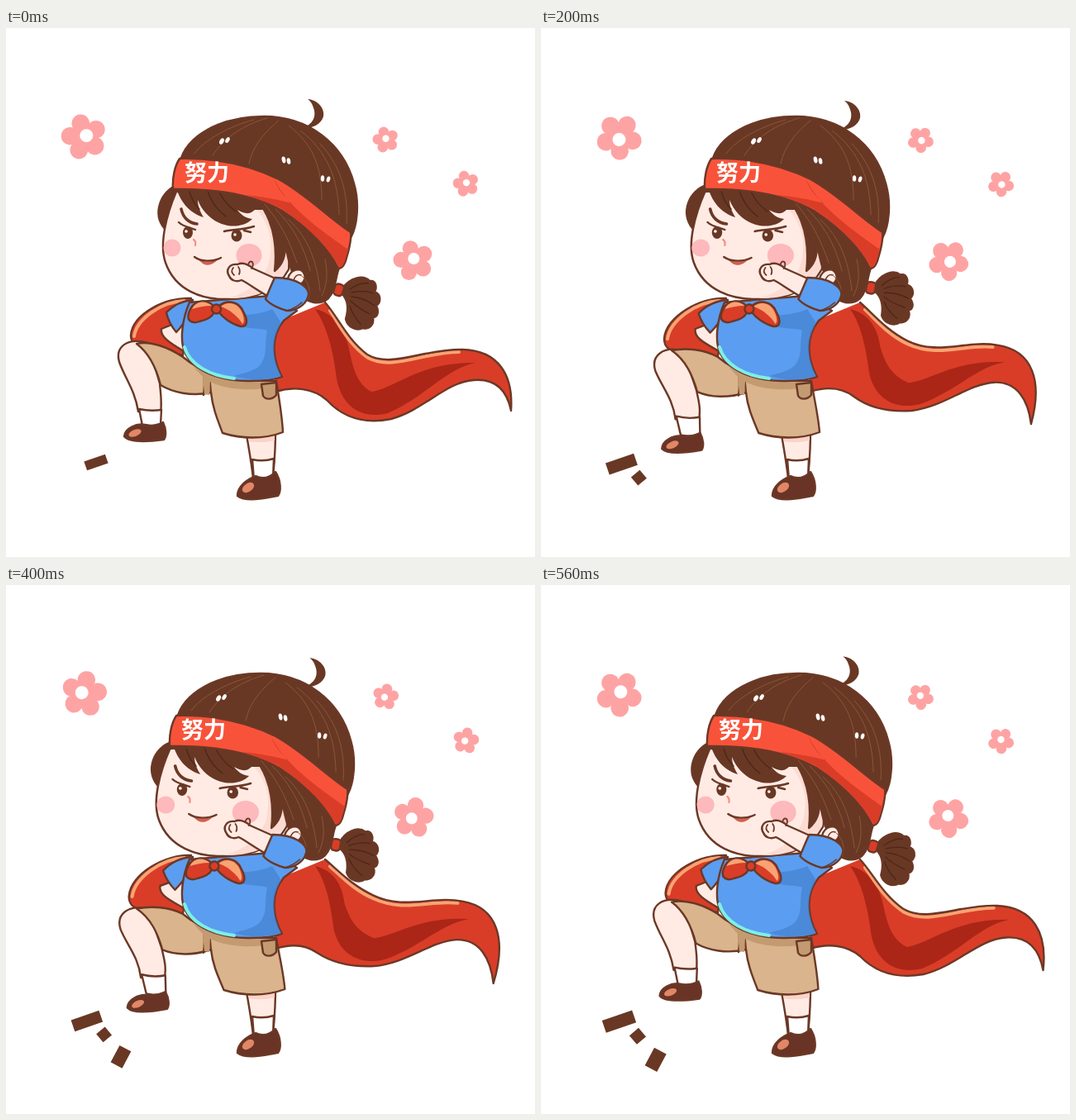
Animation of 640 by 640 pixels, one loop 600 ms. Source, as an HTML page:

```html
<!DOCTYPE html>
<html lang="zh">
<head>
<meta charset="utf-8">
<title>努力</title>
<style>
html, body { margin: 0; width: 100%; height: 100%; overflow: hidden; background: #fff; }
svg { display: block; width: 100vw; height: 100vh; }
.ln { stroke: #6b3826; stroke-width: 2.4; stroke-linejoin: round; stroke-linecap: round; }
.no { fill: none; }
.hair { fill: #683824; }
.skin { fill: #ffebe4; }
.shine { fill: none; stroke: #8d5637; stroke-width: 1; stroke-linecap: round; }
.lock { fill: none; stroke: #4d2618; stroke-width: 1.3; stroke-linecap: round; }
.red { fill: #d93d27; }
.dark { fill: #ab2617; }
.peach { fill: #f9a373; }
.blue { fill: #5b9df0; }
.navy { fill: #427fce; }
.tan { fill: #d9b48c; }
.shade { fill: #c49b70; }
.shoe { fill: #693425; }
.gloss { fill: #e28766; }
.white { fill: #fff; }
</style>
</head>
<body>
<svg viewBox="0 0 640 640">
  <g id="flowers" fill="#fea3a3"></g>
  <g id="chips" class="hair"></g>

  <!-- cape -->
  <path id="wing" class="red ln"/>
  <path id="wingEdge" class="no" stroke="#f9a373" stroke-width="4" stroke-linecap="round"/>
  <path id="cape" class="red"/>
  <path id="fold" class="dark"/>
  <path id="capeEdge" class="no" stroke="#f9a373" stroke-width="4" stroke-linecap="round"/>
  <path id="capeLine" class="ln no"/>

  <g id="tail">
    <path class="hair ln" d="M407 315 C416 302 432 298 440 306 C448 305 449 314 446 319 C454 322 454 332 448 336 C452 344 449 350 444 350 C446 360 438 365 432 363 C424 367 413 362 411 352 C414 342 415 331 407 322Z"/>
    <path class="lock" d="M416 316 C425 310 432 308 438 309 M418 320 C428 318 437 318 444 321 M418 325 C428 326 438 330 446 336 M417 330 C424 338 433 342 440 346 M416 336 C419 346 424 353 429 358"/>
    <rect class="red ln" x="397" y="310" width="11" height="14" rx="4" transform="rotate(18 403 317)"/>
  </g>

  <!-- standing leg -->
  <path class="skin ln" d="M290 486 C293 505 297 525 299 545 L323 543 C325 525 326 505 326 486Z"/>
  <path class="white ln" d="M298 522 Q311 525 324 521 L323 545 L300 547Z"/>
  <path fill="#fbd3c8" d="M292 494 L325 492 L325 499 Q308 503 294 500Z"/>
  <path class="shoe ln" d="M280 566 C280 554 292 546 302 542 C312 547 320 543 326 537 C333 548 333 561 329 566 C314 569 290 574 280 566Z"/>
  <ellipse class="gloss" cx="293" cy="556" rx="8" ry="5" transform="rotate(-35 293 556)"/>

  <!-- raised leg -->
  <path id="leg" class="skin ln"/>
  <path id="sock" class="white ln"/>
  <g id="foot">
    <path class="shoe ln" d="M143 494 C144 484 158 478 168 480 C176 482 184 480 190 477 C194 485 194 494 191 498 C176 500 150 503 143 494Z"/>
    <ellipse class="gloss" cx="156" cy="490" rx="8" ry="4" transform="rotate(-22 156 490)"/>
  </g>
  <path id="arm" class="skin ln"/>
  <path id="shorts" class="tan ln"/>
  <path id="crease" class="ln no"/>
  <path class="shade" d="M226 409 C250 424 290 430 327 428 L327 433 C300 440 268 438 247 428 L246 444 L240 443 L238 422Z"/>
  <path class="shade ln" stroke-width="1.6" d="M309 431 L327 429 L327 444 C322 450 314 450 311 445Z"/>

  <!-- shirt -->
  <path id="sleeve" class="blue ln"/>
  <path class="blue ln" d="M222 332 C214 350 209 378 217 394 C228 416 262 428 296 427 C312 427 324 426 334 422 C324 404 318 376 336 354 L352 342 L320 324Z"/>
  <path class="navy" d="M333 421 C324 404 319 380 333 357 L322 340 C300 350 276 346 262 350 C276 366 310 362 316 366 C312 384 318 400 304 411 C292 418 284 418 276 421 C296 427 318 426 333 421Z" opacity=".65"/>
  <path class="no" stroke="#7df0e6" stroke-width="4" stroke-linecap="round" d="M216 386 C222 408 248 421 276 424"/>
  <g id="scarf">
    <path class="red ln" d="M252 337 C242 327 226 328 221 345 C218 355 226 358 234 355 C244 353 250 348 252 344Z"/>
    <path class="peach" d="M225 340 C231 329 242 330 249 336 C240 336 232 338 225 340Z"/>
    <path class="red ln" d="M257 337 C266 328 282 330 287 343 C294 355 291 362 284 361 C272 358 262 350 257 343Z"/>
    <path class="peach" d="M260 337 C268 330 280 332 285 343 C288 350 289 356 286 358 C282 350 270 340 260 337Z"/>
    <circle class="red ln" cx="254.500" cy="340" r="5.500"/>
  </g>

  <g id="head">
    <g id="face">
      <path class="hair ln" d="M208 190 C188 196 176 224 192 243 L206 212 L240 196Z"/>
      <path class="skin ln" d="M206 198 C194 226 185 262 193 284 C205 318 238 329 268 328 C302 328 328 318 342 292 L345 230 L300 192Z"/>
      <path fill="#fcdcd2" d="M341 290 C328 318 300 328 268 327 C300 318 318 300 320 270 C322 246 312 228 300 216 L340 230Z"/>
      <g fill="#fdb9bb"><circle cx="201" cy="266" r="10.500"/><ellipse cx="294" cy="275" rx="15.500" ry="14"/></g>
      <path d="M227 256 Q230 258 229 263" fill="none" stroke="#f58f80" stroke-width="2.200" stroke-linecap="round"/>
      <g class="hair"><ellipse cx="220" cy="247.500" rx="6" ry="7.500"/><ellipse cx="279" cy="251" rx="6.500" ry="7.500"/></g>
      <g class="white"><circle cx="218" cy="246" r="1.800"/><circle cx="277" cy="250" r="1.800"/></g>
      <path class="ln no" d="M209 235 C214 240 221 241 229 244 M264 246 C273 243 286 245 300 240 M288 245 L296 247"/>
      <path class="ln no" style="stroke-width:3.600" d="M212 219 C214 229 221 236 231 237"/>
      <path d="M231 279 C239 284 249 283 257 279 C252 286 244 289 238 285Z" fill="#d2604e"/>
      <path class="ln no" d="M228 277 C236 283 250 283 260 278"/>
    </g>
    <path class="hair" d="M205 190 C210 210 222 224 239 229 C235 222 232 216 232 208 C238 224 252 236 268 239 C280 241 291 238 298 231 C290 230 284 226 280 220 C288 225 295 226 301 220 L330 220 L300 180Z"/>
    <path class="lock" d="M222 198 Q226 212 234 219 M244 197 Q250 216 266 228 M258 198 Q264 212 278 222"/>
    <path class="hair ln" d="M285 192 C316 212 330 248 325 294 C335 286 338 276 338 262 C341 278 343 288 347 297 L354 318 C362 334 380 336 390 327 C400 316 398 300 404 288 L416 248 L330 186Z"/>
    <path class="skin ln" d="M341 303 C344 292 357 288 361 298 C364 306 355 314 346 312Z"/>
    <path class="ln no" style="stroke-width:1.500" d="M348 305 Q351 297 357 299"/>
    <path class="shine" d="M312 212 C336 240 344 262 352 284 M326 219 C350 242 362 270 368 294 M342 232 C366 254 376 282 380 318 M358 300 C368 308 368 320 366 328 M386 280 C390 298 388 312 382 324"/>
    <path class="hair ln" d="M210 164 C217 130 260 107 312 107 C366 107 408 140 421 188 C428 212 425 240 417 254 L330 196Z"/>
    <path class="shine" d="M316 109 C290 116 264 132 250 154 M330 112 C308 130 298 146 294 164 M342 118 C374 142 382 172 382 208 M356 124 C390 150 402 184 403 226 M380 140 C406 168 414 200 412 236 M300 111 C270 119 240 135 228 152"/>
    <g class="white">
      <ellipse cx="261" cy="137" rx="2.500" ry="4" transform="rotate(28 261 137)"/>
      <ellipse cx="268" cy="135.500" rx="2.300" ry="3.800" transform="rotate(28 268 135.500)"/>
      <ellipse cx="336" cy="159.500" rx="2.300" ry="4" transform="rotate(-12 336 159.500)"/>
      <ellipse cx="342" cy="161" rx="2.200" ry="3.800" transform="rotate(-12 342 161)"/>
      <ellipse cx="383" cy="182" rx="2.200" ry="3.800"/>
      <ellipse cx="390" cy="183" rx="2.200" ry="3.600" transform="rotate(15 390 183)"/>
    </g>
    <path fill="#f8533a" class="ln" d="M210 158 C204 167 201 182 202 195 C250 194 296 200 334 221 C366 242 390 266 402 291 C407 291 410 286 412 278 C416 265 418 256 417 247 C392 231 364 202 330 183 C294 165 252 157 210 158Z"/>
    <path class="red" d="M324 182 C336 208 362 232 414 268 L411 278 C409 287 406 290 403 289 C388 262 362 238 334 219 C318 211 302 205 288 202 C312 204 330 208 346 212 C336 204 328 194 324 182Z"/>
    <text x="216" y="185" font-family="'Noto Sans CJK SC','Noto Sans CJK',sans-serif" font-size="27" font-weight="900" fill="#fff">努力</text>
  </g>
  <path id="curl" class="hair" d="M358 121 C371 117 377 107 371 94 C370 91 368 88 365 86 C377 87 386 97 384 107 C381 117 370 122 358 121Z"/>

  <!-- raised arm -->
  <g id="fist">
    <path class="skin ln" d="M270 300 C265 292 271 285 280 286 C286 283 293 286 299 291 L328 304 L316 324 C302 316 293 309 285 305 C278 308 272 305 270 300Z"/>
    <path class="ln no" style="stroke-width:1.800" d="M275 290 Q271 295 276 299 M281 289 Q284 293 282 298 M293 287 Q294 281 298 283 Q300 287 297 291"/>
  </g>
  <g id="cuff">
    <path class="blue ln" d="M325 302 C334 302 346 303 356 309 C364 314 368 320 365 326 C362 336 350 342 340 342 C332 340 320 335 314 328 C317 320 321 311 325 302Z"/>
    <path class="ln no" style="stroke-width:1.500" d="M340 342 Q350 339 358 332"/>
  </g>
</svg>
<script>
const $ = id => document.getElementById(id);
const NS = 'http://www.w3.org/2000/svg';
const LOOP = 600, STEP = 40;

function add(parent, tag, attrs) {
  const el = document.createElementNS(NS, tag);
  for (const k in attrs) el.setAttribute(k, attrs[k]);
  return parent.appendChild(el);
}

const lerp = (a, b, k) => a + (b - a) * k;

// Blend two path strings that share the same commands
function mix(a, b, k) {
  const ends = b.match(/-?[\d.]+/g);
  let i = 0;
  return a.replace(/-?[\d.]+/g, n => lerp(+n, +ends[i++], k).toFixed(2));
}

// Linear track through [time, value] pairs
function track(keys, t) {
  const i = Math.max(1, keys.findIndex(p => p[0] >= t));
  const [t0, v0] = keys[i - 1], [t1, v1] = keys[i];
  return lerp(v0, v1, (t - t0) / (t1 - t0));
}

const sway = [[0, 0], [120, .37], [200, .67], [280, .98], [320, 1.03], [360, .98], [440, .6], [560, .13], [600, 0]];
const burst = [[0, 0], [120, .41], [200, .7], [280, 1], [360, .76], [440, .59], [480, .55], [560, .88], [600, 1]];

const capeTop = [
  'M386 332 C402 350 412 376 437 395 C466 412 505 388 552 389 C596 390 614 420 611 463',
  'M386 332 C402 344 420 360 446 370 C486 389 520 372 552 381 C594 390 604 430 584 487'];
const capeLow = [
  ' C606 438 592 424 566 426 C532 428 506 462 466 473 C436 479 410 474 388 450 C372 436 348 433 326 440',
  ' C581 455 568 430 540 430 C508 432 480 456 440 458 C412 458 390 452 374 444 C362 436 348 433 326 440'];

const shapes = {
  cape: [0, 1].map(i => capeTop[i] + capeLow[i] + ' L318 360Z'),
  capeLine: [0, 1].map(i => capeTop[i] + capeLow[i]),
  capeEdge: [
    'M392 342 C404 360 415 383 438 399 C468 415 505 392 548 392',
    'M392 340 C406 350 422 365 446 374 C486 392 518 377 546 383'],
  fold: [
    'M374 340 C398 346 410 364 415 388 C420 412 424 430 442 440 C470 436 500 404 568 405 C532 412 508 446 462 466 C430 474 406 458 400 424 C396 390 388 360 374 340Z',
    'M374 340 C398 346 406 364 408 384 C414 402 424 416 446 424 C476 420 500 400 558 404 C526 408 500 436 456 450 C430 456 404 446 396 416 C392 388 388 360 374 340Z'],
  wing: [
    'M224 327 C194 325 152 346 151 372 C151 380 157 385 166 385 L214 396Z',
    'M224 327 C194 325 150 350 148 378 C148 388 154 393 162 394 L214 398Z'],
  wingEdge: [
    'M216 330 C188 331 158 352 155 373',
    'M216 330 C188 331 155 355 152 378'],
  leg: [
    'M172 381 C146 374 132 386 137 404 C144 424 156 438 160 464 L187 466 C189 452 187 442 186 430Z',
    'M172 395 C148 389 133 402 139 420 C147 439 161 452 164 478 L193 478 C196 464 192 454 189 442Z'],
  sock: [
    'M161 461 Q174 464 188 462 L187 480 Q176 484 165 481Z',
    'M165 474 Q180 478 194 475 L195 496 Q182 501 171 498Z'],
  arm: [
    'M208 356 L188 364 C186 374 200 382 215 391 L218 366Z',
    'M208 356 L186 364 C184 376 200 382 215 391 L218 366Z'],
  shorts: [
    'M158 382 C174 378 196 386 214 398 C244 424 290 428 327 427 C330 446 334 468 335 489 C312 498 284 497 262 490 C256 474 250 460 248 441 C224 446 202 441 187 432 C182 412 174 394 158 382Z',
    'M158 394 C176 391 198 390 214 398 C244 424 290 428 327 427 C330 446 336 468 338 489 C314 498 286 497 264 490 C257 474 250 460 248 441 C228 449 206 450 190 444 C184 424 176 406 158 394Z'],
  crease: ['M246 420 Q247 432 248 442 M239 419 Q241 430 239 444', 'M246 420 Q247 432 248 442 M239 419 Q241 430 239 445'],
  sleeve: [
    'M226 329 C212 330 202 336 194 344 C196 354 201 362 206 368 C212 362 216 356 220 348Z',
    'M226 329 C210 330 198 336 189 346 C192 354 198 363 204 369 C211 362 216 356 220 348Z']
};

// Pivot, petal ring, petal radius, hole radius, hole offset
const flowers = [
  [94.5, 131.8, 17, 10.8, 8, 2.8, -1.6],
  [459.3, 135.2, 9.6, 6.3, 4.2, .2, -1.4],
  [556.5, 188.4, 9.6, 6.3, 4.2, .5, -1.3],
  [493, 281.4, 15, 9.6, 7, .3, -2.4]
].map(([x, y, ring, r, hole, dx, dy]) => {
  const g = add($('flowers'), 'g', {});
  for (let i = 0; i < 5; i++) {
    const a = Math.PI * (1.02 + i * .4);
    add(g, 'circle', { cx: x + ring * Math.cos(a), cy: y + ring * Math.sin(a), r });
  }
  add(g, 'circle', { cx: x, cy: y, r: ring * .9 });
  add(g, 'circle', { cx: x + dx, cy: y + dy, r: hole, fill: '#fff' });
  return { g, x, y };
});

// Start time, near and far centre, near and far size, tilt
const chips = [
  { at: 0, from: [109, 525.5, 27, 11.5], to: [92.5, 528.5, 40, 16], tilt: -19 },
  { at: 120, from: [124, 537.5, 11, 10], to: [116, 547, 15, 14.5], tilt: -40 },
  { at: 240, from: [140, 559, 13, 19], to: [138.5, 576.5, 17, 25], tilt: 28 }
].map(c => ({ ...c, el: add($('chips'), 'rect', {}) }));

function move(id, x, y, extra = '') {
  $(id).setAttribute('transform', `translate(${x} ${y}) ${extra}`);
}

function draw(t) {
  const k = track(sway, t), h = Math.sin(Math.PI * t / LOOP), b = track(burst, t);

  for (const id in shapes) $(id).setAttribute('d', mix(...shapes[id], k));

  for (const f of flowers)
    f.g.setAttribute('transform', `rotate(${360 * t / LOOP} ${f.x} ${f.y})`);

  for (const c of chips) {
    const [x, y, w, l] = c.from.map((v, i) => lerp(v, c.to[i], b));
    c.el.setAttribute('visibility', t >= c.at ? 'visible' : 'hidden');
    c.el.setAttribute('x', x - w / 2);
    c.el.setAttribute('y', y - l / 2);
    c.el.setAttribute('width', w);
    c.el.setAttribute('height', l);
    c.el.setAttribute('transform', `rotate(${c.tilt} ${x} ${y})`);
  }

  move('foot', 4.5 * k, 20.5 * k, `rotate(${-4 * k} 168 489)`);
  move('head', -4.5 * h, 0);
  const sx = 1 + .045 * h;
  move('face', 300 * (1 - sx), 0, `scale(${sx} 1)`);
  move('curl', 3 * k, 3 * k);
  move('tail', -4 * h, -3 * h, `rotate(${-9 * h} 403 317)`);
  move('fist', -4 * h, 0);
  move('cuff', -3 * h, 0);
  move('scarf', -3 * h, 0);
}

function tick() {
  draw(Math.floor(performance.now() % LOOP / STEP) * STEP);
  requestAnimationFrame(tick);
}
tick();
</script>
</body>
</html>
```
